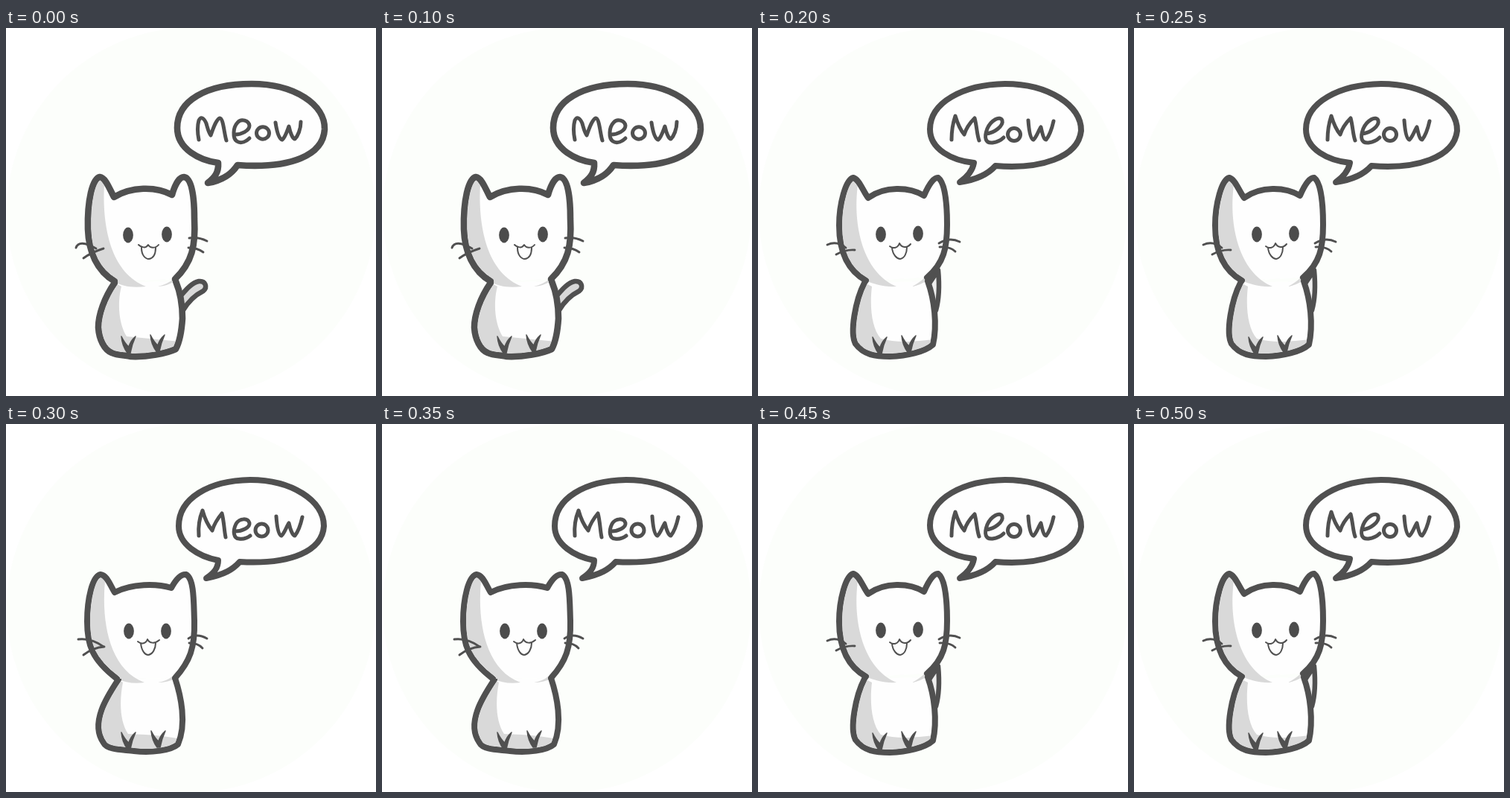
An HTML page without scripts that plays this animation: 497 by 494 pixels, repeating every 550 ms.

```html
<!DOCTYPE html>
<html lang="en">
<head>
<meta charset="utf-8">
<title>Meowing kitten</title>
<style>
html, body { margin: 0; width: 100%; height: 100%; overflow: hidden; background: #fff; }
svg { display: block; width: 497px; height: 494px; }
path, ellipse { fill: none; stroke: #505050; stroke-linecap: round; stroke-linejoin: round; }
.line { stroke-width: 8; fill: #fefefe; }
.out .line { stroke-width: 8.6; }
.tail { stroke-width: 6.5; fill: #d9d9d9; }
/* Darken keeps the outlines clear where shading overlaps them */
.shade { fill: #d9d9d9; stroke: none; mix-blend-mode: darken; }
.letters { stroke-width: 5; }
.whiskers { stroke-width: 2.9; }
.mouth { stroke-width: 2; }
.eye { fill: #4c4c4c; stroke: none; }
.paw { fill: #505050; stroke-width: 1.5; }

/* Tail out, tail tucked, tail hidden, tail tucked */
.pose { visibility: hidden; animation: 550ms step-end infinite; }
.out { animation-name: out; }
.tucked { animation-name: tucked; }
.hidden { animation-name: hidden; }
@keyframes out {
  0% { visibility: visible; }
  27.2727%, 100% { visibility: hidden; }
}
@keyframes tucked {
  0%, 54.5455% { visibility: hidden; }
  27.2727%, 81.8182%, 100% { visibility: visible; }
}
@keyframes hidden {
  0%, 81.8182%, 100% { visibility: hidden; }
  54.5455% { visibility: visible; }
}
</style>
</head>
<body>
<svg viewBox="0 0 497 494" role="img" aria-label="A kitten says Meow">
  <defs>
    <path id="paw" class="paw" d="M-10 -21Q-9 -8 -2 1H2Q4 -10 9 -21Q2 -15 0 -7Q-5 -11 -10 -21Z"/>
    <ellipse id="eye" class="eye" rx="6.9" ry="10.4"/>
  </defs>
  <circle cx="248.5" cy="247" r="247.5" fill="#fcfefb"/>

  <g class="pose out">
    <path class="line" d="M285 181C261 178 230 163 230 134C230 98 268 75 330 75C388 75 429 103 428 136C426 171 383 189 311 184C305 193 295 204 271 208C280 201 286 194 285 181Z"/>
    <g class="letters">
      <path d="M259 150C257 140 257 131 259 124C262 118 266 121 269 128C271 135 272 140 275 144C278 136 282 123 287 121C292 121 293 142 296 151"/>
      <path d="M308 143C316 143 327 138 327 131C326 124 316 121 311 127C305 133 304 148 310 152C316 156 323 152 327 148"/>
      <ellipse cx="345" cy="141" rx="8.5" ry="8.2"/>
      <path d="M362 127C364 140 367 149 371 150C375 147 378 137 380 132C382 141 385 149 388 149C392 145 396 136 396 126"/>
    </g>
    <path class="tail" d="M236 358C243 350 250 342 259 340C268 339 271 348 265 353C255 358 246 365 238 379"/>
    <path class="line" d="M146 342C132 362 124 385 124 402C125 418 132 432 142 436C150 440 160 439 168 441C190 442 215 437 228 431C234 420 236 405 237 390C237 368 233 352 228 340"/>
    <path class="shade" d="M146 342L155 347C149 370 152 398 162 414L234 421L228 431C215 437 190 442 168 441C160 439 150 440 142 436C132 432 125 418 124 402C124 385 132 362 146 342Z"/>
    <path class="line" d="M146 340C122 326 111 300 110 270C109 232 116 202 126 200C134 201 139 216 145 227C168 213 201 212 223 224C227 210 233 200 239 200C250 201 253 228 253 256C255 292 250 315 227 337"/>
    <path class="shade" d="M126 200L132 210C129 260 138 328 188 347C170 349 155 347 146 340C122 326 111 300 110 270C109 232 116 202 126 200Z"/>
    <path class="shade" d="M204 347Q217 344 226 336L228 339Q218 346 204 347Z"/>
    <use href="#eye" x="164" y="278"/>
    <use href="#eye" x="216" y="277"/>
    <path class="mouth" d="M178 291C182 295 188 296 191 291C194 296 201 296 205 291M182 295C182 305 187 310 192 310C198 309 201 303 201 295"/>
    <path class="whiskers" d="M94 295Q98 283 121 296M104 309Q115 301 131 296M246 282Q258 280 270 286M245 295Q257 295 265 301"/>
    <use href="#paw" x="165" y="435"/>
    <use href="#paw" x="204" y="433"/>
  </g>

  <g class="pose tucked">
    <path class="line" d="M290 181C261 178 231 163 231 136C231 100 275 76 332 75C390 75 435 104 434 138C430 174 379 190 319 185C311 194 298 203 271 207C281 200 288 192 290 181Z"/>
    <g class="letters">
      <path d="M260 150C260 139 262 127 265 118C268 128 272 137 277 143C280 133 286 126 291 121C294 132 294 143 297 151"/>
      <path d="M306 142C318 141 330 131 328 124C325 117 313 124 308 135C303 148 306 155 315 154C322 153 327 150 330 147"/>
      <ellipse cx="344" cy="143" rx="8.5" ry="8.5"/>
      <path d="M363 124C364 138 366 149 370 150C374 147 377 137 380 133C382 142 384 150 387 150C391 145 395 134 397 125"/>
    </g>
    <path class="tail" style="fill:#eee" d="M230 343L242 325C244 347 243 365 239 379"/>
    <path class="line" d="M143 342C131 365 123 409 131 424C142 439 158 441 177 441C200 440 224 435 235 425C241 398 237 365 228 340"/>
    <path class="shade" d="M143 342L153 347C150 372 152 402 165 417C188 424 216 420 236 418L235 425C224 435 200 440 177 441C158 441 142 439 131 424C123 409 131 365 143 342Z"/>
    <path class="line" d="M145 339C118 324 109 296 109 265C109 236 118 203 128 201C136 203 141 219 148 228C170 212 203 213 223 225C229 211 236 200 242 201C252 208 254 240 254 264C254 294 250 316 227 335"/>
    <path class="shade" d="M128 201L134 211C127 265 141 328 186 347C170 348 156 344 145 339C118 324 109 296 109 265C109 236 118 203 128 201Z"/>
    <path class="shade" d="M207 347Q217 342 225 334L230 337Q219 345 207 347Z"/>
    <use href="#eye" x="165" y="277"/>
    <use href="#eye" x="215" y="276"/>
    <path class="mouth" d="M177 293C182 297 188 295 190 289C193 295 200 296 205 290M180 295C181 305 187 310 191 310C197 309 200 302 200 294"/>
    <path class="whiskers" d="M93 291Q106 285 118 295M105 304Q118 297 130 298M243 289Q257 280 271 287M244 294Q258 293 265 300"/>
    <use href="#paw" x="164" y="436"/>
    <use href="#paw" x="203" y="434"/>
  </g>

  <g class="pose hidden">
    <path class="line" d="M285 183C259 178 232 162 232 137C232 100 272 76 328 75C384 75 427 103 427 137C425 170 384 189 314 185C305 195 294 202 269 207C279 200 285 194 285 183Z"/>
    <g class="letters">
      <path d="M259 150C258 139 260 126 264 116C267 127 272 137 277 143C280 133 285 126 290 120C293 131 293 143 295 152"/>
      <path d="M308 144C317 144 328 139 327 133C325 126 314 126 309 134C304 144 306 154 313 154C319 155 324 153 328 150"/>
      <ellipse cx="343.5" cy="142.5" rx="8.5" ry="8.5"/>
      <path d="M363 124C364 138 366 149 370 150C374 147 377 137 380 133C382 142 385 150 388 150C392 145 396 134 398 125"/>
    </g>
    <path class="line" d="M151 343C137 364 112 401 131 428C136 438 158 437 172 439C195 442 222 438 231 430C243 402 235 365 227 341"/>
    <path class="shade" d="M151 343L157 347C152 372 153 400 164 416C188 417 212 418 234 423L231 430C222 438 195 442 172 439C158 437 136 438 131 428C112 401 137 364 151 343Z"/>
    <path class="line" d="M149 342C115 316 109 296 109 265C109 235 116 204 127 202C136 203 140 217 146 226C169 214 202 214 222 220C228 209 235 201 242 202C253 208 252 240 253 264C254 300 247 319 227 341"/>
    <path class="shade" d="M127 202L133 211C128 264 138 329 186 347C172 349 160 347 149 342C115 316 109 296 109 265C109 235 116 204 127 202Z"/>
    <path class="shade" d="M204 347Q216 345 223 339L228 341Q218 347 204 347Z"/>
    <use href="#eye" x="165" y="278"/>
    <use href="#eye" x="215" y="278"/>
    <path class="mouth" d="M177 292C182 296 188 295 190 289C193 295 200 295 206 290M181 294C182 305 187 310 191 310C197 309 201 302 201 294"/>
    <path class="whiskers" d="M97 289Q115 287 131 299M104 310Q117 300 132 299M245 288Q256 280 270 288M246 294Q258 294 264 301"/>
    <use href="#paw" x="165" y="435"/>
    <use href="#paw" x="205" y="433"/>
  </g>
</svg>
</body>
</html>
```
